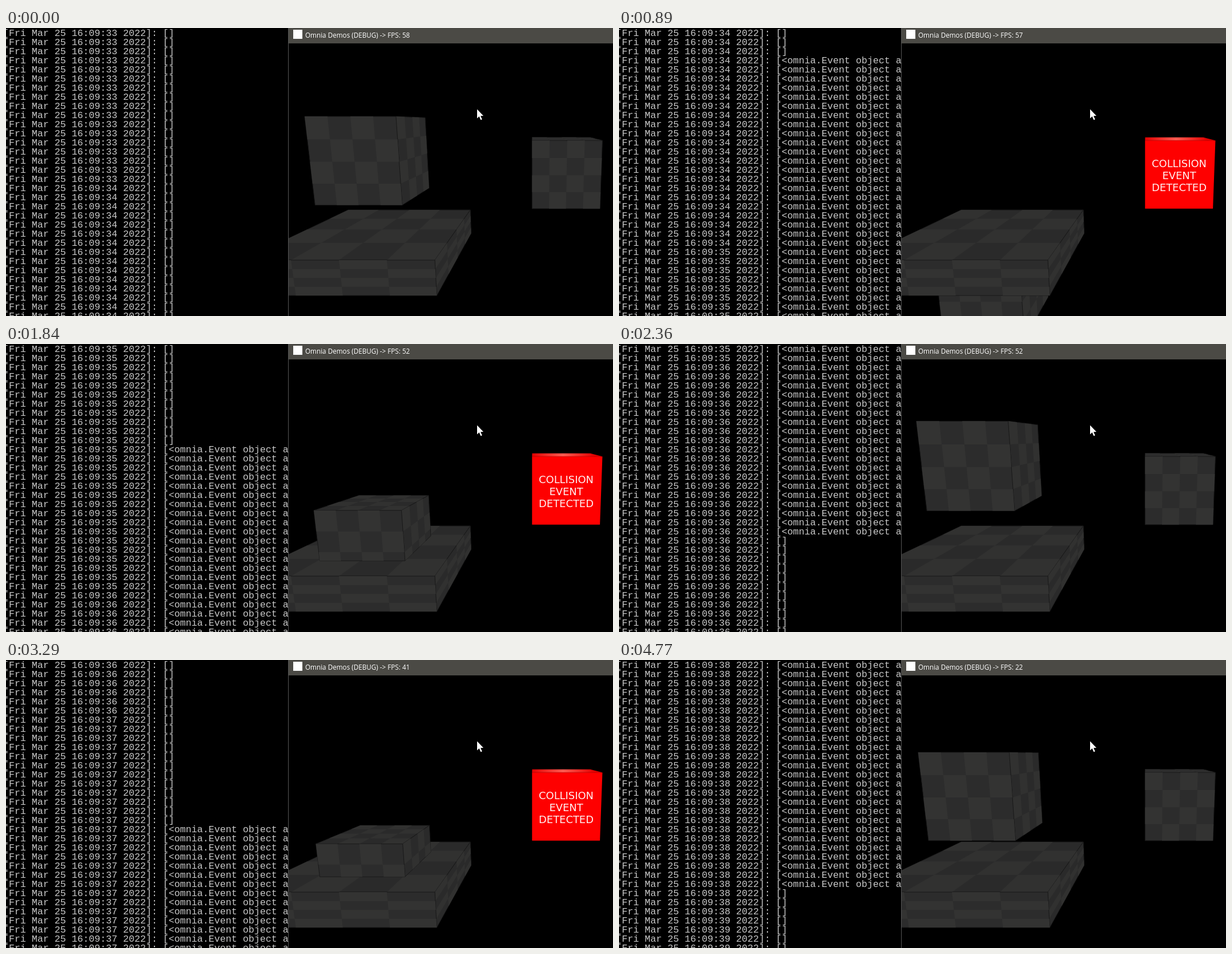
Write an HTML page with a canvas that moves like this. It is 1063 by 505 pixels and loops after 4840 ms.

```html
<!DOCTYPE html>
<html lang="en">
<head>
<meta charset="utf-8">
<title>Collision demo</title>
<style>
  html, body { margin: 0; width: 100%; height: 100%; overflow: hidden; background: #000; }
  #stage { position: relative; width: 1063px; height: 505px; overflow: hidden; background: #000; }
  #terminal { position: absolute; left: 0; top: 0; width: 494px; height: 505px; overflow: hidden; }
  #log { position: absolute; left: -5px; top: 2px; margin: 0; color: #c8c8c8;
         font: 16.667px/16px "Liberation Mono", monospace; }
  #window { position: absolute; left: 494px; top: 0; width: 569px; height: 505px;
            box-sizing: border-box; border-left: 1px solid #555; }
  #bar { height: 27px; background: #4b4a45; }
  #icon { position: absolute; left: 8px; top: 3px; width: 16px; height: 16px; background: #fff; }
  #caption { position: absolute; left: 29px; top: 0; white-space: pre; color: #fff;
             font: 11.7px/24px "Open Sans", sans-serif; }
  #scene { position: absolute; left: 0; top: 0; }
</style>
</head>
<body>
<div id="stage">
  <div id="terminal"><pre id="log"></pre></div>
  <div id="window">
    <div id="bar"></div>
    <div id="icon"></div>
    <div id="caption"></div>
  </div>
  <canvas id="scene" width="1063" height="505"></canvas>
</div>
<script>
const LOOP = 4840;
const ctx = document.getElementById('scene').getContext('2d');
const log = document.getElementById('log');
const caption = document.getElementById('caption');

// [x, y] points of piecewise linear curves
const CAPTURE = [[0, 0], [50, 1], [610, 13], [890, 19], [1140, 24], [1690, 36], [1840, 39], [2260, 48],
  [2360, 50], [2820, 59], [2870, 60], [3390, 71], [3900, 81], [3930, 82], [4460, 93], [4770, 100], [4840, 101]];
const HEIGHT = [[0, -0.44], [1147, -2.64], [2480, -0.09], [2870, -0.84], [3720, -2.37], [4770, -0.482], [4840, -0.36]];
const PRINTED = [[0, 0], [890, 45], [1840, 92], [2360, 117], [2870, 141], [3340, 163], [3900, 183],
  [4410, 207], [4770, 221], [4840, 224]];
const HITS = [[17, 54], [72, 107], [146, 215]];
const SECOND_STARTS = [-14, 38, 88, 134, 176, 218];
const FPS = [[4550, 22], [3550, 24], [2550, 41], [1550, 52], [550, 57], [0, 58]];

function lerpCurve(curve, x, from = 0, to = 1) {
  let i = 1;
  while (i < curve.length - 1 && x >= curve[i][from]) i++;
  const a = curve[i - 1], b = curve[i];
  return a[to] + (b[to] - a[to]) * (x - a[from]) / (b[from] - a[from]);
}

function captureTime(t) {
  const step = Math.floor(lerpCurve(CAPTURE, t) + 1e-6);
  return lerpCurve(CAPTURE, step, 1, 0);
}

const isHit = row => HITS.some(([a, b]) => row >= a && row < b);

function logLine(row) {
  const second = 33 + SECOND_STARTS.filter(s => row >= s).length;
  return `[Fri Mar 25 16:09:${second} 2022]: ` + (isHit(row) ? '[<omnia.Event object at' : '[]');
}

// Camera: 45 degree view, pitched 10 degrees down, centred on an 854 x 480 viewport
const FOCAL = 240 / Math.tan(Math.PI / 8);
const COS = Math.cos(Math.PI / 18), SIN = Math.sin(Math.PI / 18);

function project(x, y, z) {
  const depth = z * COS - y * SIN;
  return [922 + FOCAL * x / depth, 267 - FOCAL * (y * COS + z * SIN) / depth];
}

function tracePath(points) {
  ctx.beginPath();
  points.forEach(p => ctx.lineTo(...p));
  ctx.closePath();
}

function fillQuad(at, u0, u1, v0, v1, color, edge) {
  tracePath([at(u0, v0), at(u1, v0), at(u1, v1), at(u0, v1)]);
  ctx.fillStyle = color;
  ctx.fill();
  if (edge) {
    ctx.strokeStyle = edge;
    ctx.stroke();
  }
}

// A 4 x 4 checkered face; v runs from v0 to v1 when partly hidden
function drawFace(at, v0 = 0, v1 = 1, dark = '#2c2c2c', light = '#333332') {
  fillQuad(at, 0, 1, v0, v1, dark, '#191919');
  for (let row = 0; row < 4; row++) {
    const top = Math.max(row / 4, v0), bottom = Math.min((row + 1) / 4, v1);
    if (top >= bottom) continue;
    for (let col = row % 2; col < 4; col += 2) {
      fillQuad(at, col / 4, (col + 1) / 4, top, bottom, light);
    }
  }
}

function drawBox({ x, y, z, w, h, d }, low = -Infinity, high = Infinity) {
  const v0 = Math.max(0, (y - high) / h), v1 = Math.min(1, (y - low) / h);
  if (v0 >= v1) return;
  if (y < 0 && v0 === 0) {
    drawFace((u, v) => project(x + u * w, y, z + (1 - v) * d), 0, 1, '#2a2a2a', '#313130');
  }
  if (x + w < 0) {
    drawFace((u, v) => project(x + w, y - v * h, z + u * d), v0, v1, '#2a2a2a', '#313130');
  }
  drawFace((u, v) => project(x + u * w, y - v * h, z), v0, v1);
}

const SLAB = { x: -3.018, y: -1.42, z: 3.253, w: 2, h: 0.4, d: 2 };
const SIGN = { x: -0.006, y: -0.26, z: 4.73, w: 1, h: 1, d: 1 };

function drawAlarm() {
  const { x, y, z } = SIGN;
  const shine = ctx.createLinearGradient(921, 0, 1030, 0);
  shine.addColorStop(0, '#e00000');
  shine.addColorStop(0.5, '#ff5a50');
  shine.addColorStop(1, '#e00000');
  fillQuad((u, v) => project(x + u, y, z + v), 0, 1, 0, 1, shine);
  fillQuad((u, v) => project(x + u, y - v, z), 0, 1, 0, 1, '#fe0000');
  ctx.fillStyle = '#fff0f0';
  ctx.font = '17.9px "DejaVu Sans", sans-serif';
  ctx.textAlign = 'center';
  ['COLLISION', 'EVENT', 'DETECTED'].forEach((word, i) => ctx.fillText(word, 981, 243.5 + 21 * i));
}

function drawCursor() {
  const shape = [[0, 0], [0, 16], [3.6, 12.6], [6.4, 18.8], [8.8, 17.7], [6.1, 11.7], [11, 11.4]];
  tracePath(shape.map(([x, y]) => [825 + x, 142.5 + y]));
  ctx.fillStyle = '#fff';
  ctx.fill();
}

function drawScene(centre, alarm) {
  const cube = { x: -2.495, y: centre + 0.5, z: 3.69, w: 1, h: 1, d: 1 };
  ctx.clearRect(0, 0, 1063, 505);
  ctx.save();
  ctx.beginPath();
  ctx.rect(495, 27, 568, 478);
  ctx.clip();
  ctx.lineWidth = 1;
  ctx.lineJoin = 'round';
  drawBox(cube, -Infinity, SLAB.y - SLAB.h);
  drawBox(SLAB);
  drawBox(cube, SLAB.y);
  if (alarm) drawAlarm();
  else drawBox(SIGN);
  drawCursor();
  ctx.restore();
}

let shown = -1;

function render(now) {
  const t = captureTime(now % LOOP);
  if (t !== shown) {
    shown = t;
    const last = Math.round(lerpCurve(PRINTED, t));
    log.textContent = Array.from({ length: 32 }, (_, i) => logLine(last - 31 + i)).join('\n');
    caption.textContent = 'Omnia Demos (DEBUG) -> FPS: ' + FPS.find(([from]) => t >= from)[1];
    drawScene(lerpCurve(HEIGHT, t), isHit(last));
  }
}

const start = performance.now();
function tick() {
  render(performance.now() - start);
  requestAnimationFrame(tick);
}
tick();
</script>
</body>
</html>
```
